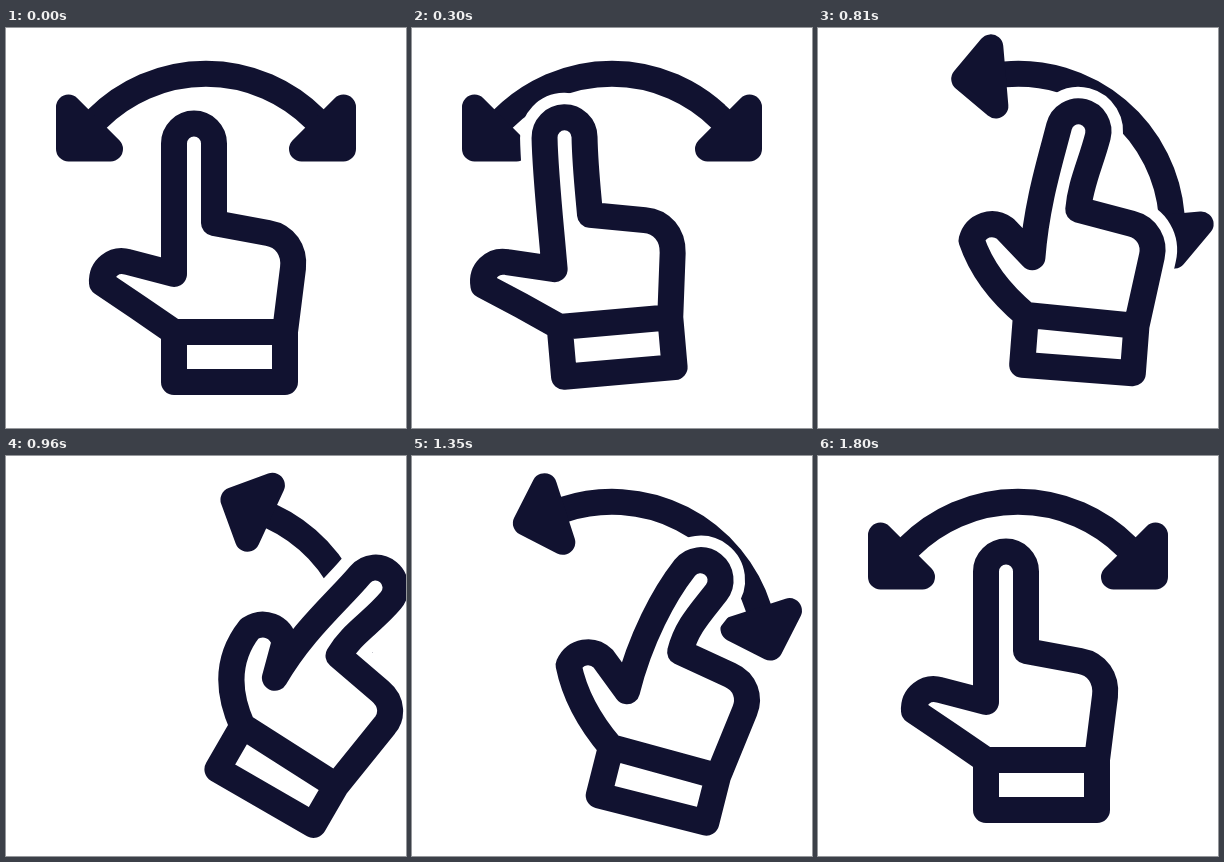
An HTML page that plays this animation: 400x400 px, repeating every 3830 ms.

```html
<!DOCTYPE html>
<html lang="en">
<head>
<meta charset="utf-8">
<title>Swipe gesture</title>
<style>
  html, body { margin: 0; width: 100%; height: 100%; overflow: hidden; background: #fff; }
  svg { display: block; width: 100%; height: 100%; }
  path { stroke-linejoin: round; stroke-linecap: round; }
</style>
</head>
<body>
<svg viewBox="0 0 400 400">
  <g id="arc" stroke="#111230">
    <path d="M91 91A154 154 0 0 1 309 91" fill="none" stroke-width="26"/>
    <path d="M62.5 79V121H104.5Z M337.5 79V121H295.5Z" fill="#111230" stroke-width="25"/>
  </g>
  <g id="hand" fill="#fff">
    <path class="outline" stroke="#fff" stroke-width="49"/>
    <path class="outline" stroke="#111230" stroke-width="26"/>
  </g>
</svg>
<script>
const LOOP = 3830;
const arc = document.getElementById('arc');
const hand = document.getElementById('hand');
const outlines = document.querySelectorAll('.outline');

// Eased 0 to 1 between two times
function ramp(t, from, to) {
  const s = Math.min(1, Math.max(0, (t - from) / (to - from)));
  return s * s * (3 - 2 * s);
}

// Point (x, y) relative to a pivot, turned and scaled around it
function around([px, py], x, y, degrees, scale = 1) {
  const a = degrees * Math.PI / 180, c = Math.cos(a) * scale, s = Math.sin(a) * scale;
  return [px + x * c - y * s, py + x * s + y * c];
}

function handPath(shift, turn, lift) {
  const tip = [188 + shift, 115.5 + shift * turn / 130];
  const near = (x, y) => around(tip, x, y, turn);
  const thumb = (x, y) => around([168, 304], x, y, 30 * lift, 1 + 0.12 * lift);
  const lean = 8 * Math.max(0, lift);
  const wrist = 304 + lean * 0.6;
  return [
    'M', 168 + lean / 2, 246,
    'C', 168 + lean / 2, 192, near(-20, 34), near(-20, 0),
    'A20 20 0 0 1', near(20, 0),
    'C', near(20, 28), 208 + lean, 170, 208 + lean, 195,
    'L', 262 + lean, 205,
    'C', 279 + lean, 208, 289 + lean / 2, 222, 287 + lean / 2, 240 - lean,
    'L 279', wrist, 'V354H168V304',
    'Q', 132 - 14 * lift, 279 - 11 * lift, thumb(-72, -49),
    'C', thumb(-73, -64), thumb(-60, -74), thumb(-46, -70),
    'Z M168 304L279', wrist
  ].join(' ');
}

function draw(t) {
  // Hand: slide aside, pull left, swipe right, return
  const slide = ramp(t, 0, 300);
  const pull = ramp(t, 235, 490);
  const reach = ramp(t, 650, 810);
  const push = ramp(t, 648, 945);
  const recoil = ramp(t, 945, 1200);
  const home = ramp(t, 1180, 1510);
  const curl = ramp(t, 1190, 1350);
  const uncurl = ramp(t, 1350, 1600);

  const x = 223.5 - 22 * slide + 35 * pull + 23 * reach - 36 * home;
  const y = 354 - 9.5 * slide - 3.5 * pull + 11 * recoil + 2 * home;
  const tilt = -30 * pull + 60 * push - 30 * home;
  const shift = 8 * pull + 18 * push - 26 * uncurl;
  const turn = 24 * pull - 14 * reach + 14 * curl - 24 * uncurl;
  const lift = -0.15 * pull + 1.15 * push - home;

  const d = handPath(shift, turn, lift);
  outlines.forEach(p => p.setAttribute('d', d));
  hand.setAttribute('transform', `translate(${x} ${y}) rotate(${tilt}) translate(-223.5 -354)`);

  // Arc: dragged along, then swings past its rest on the way back
  const spin = 70 * push - 8 * recoil - 76 * ramp(t, 1190, 1530) + 14 * ramp(t, 1530, 1800);
  arc.setAttribute('transform', `rotate(${spin} 200 200)`);
}

const start = performance.now();
function tick() {
  draw((performance.now() - start) % LOOP);
  requestAnimationFrame(tick);
}
tick();
</script>
</body>
</html>
```
